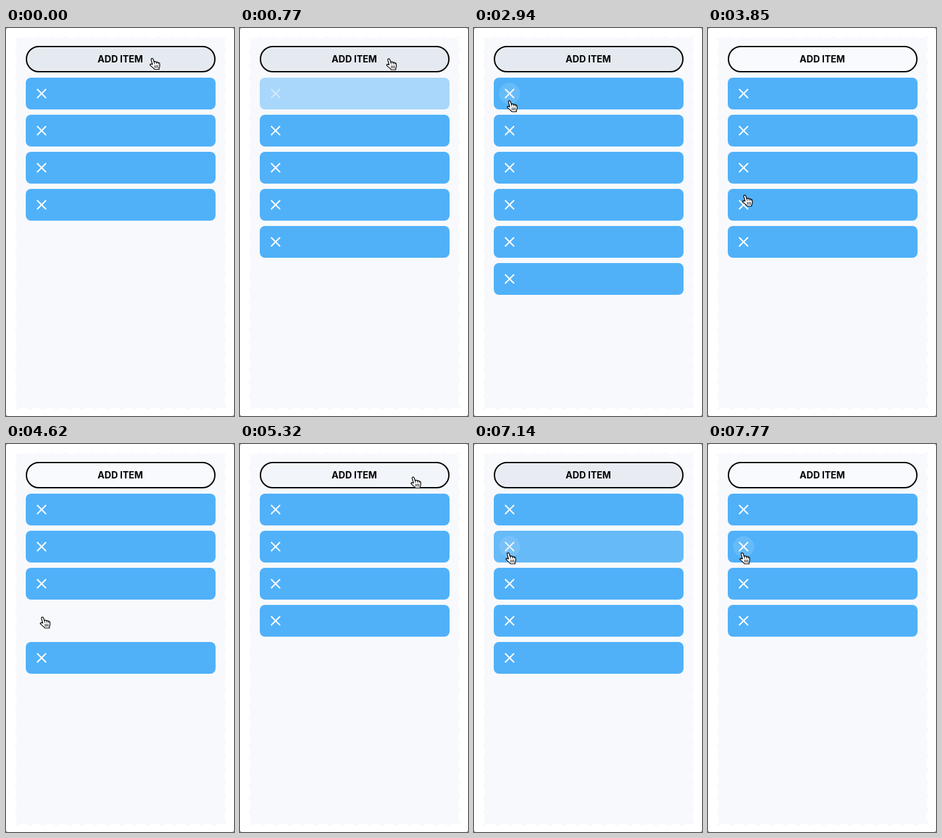
An HTML page with a canvas for the animation above (7840 ms loop, 346x586 px).

```html
<!DOCTYPE html>
<html lang="en">
<head>
<meta charset="utf-8">
<title>Item list</title>
<style>
html, body { margin: 0; width: 100%; height: 100%; overflow: hidden; background: #fff; }
canvas { display: block; width: 346px; height: 586px; }
</style>
</head>
<body>
<canvas id="stage"></canvas>
<script>
const W = 346, H = 586, LOOP = 7840, STEP = 70;
const canvas = document.getElementById('stage');
const ctx = canvas.getContext('2d');
const dpr = window.devicePixelRatio || 1;
canvas.width = W * dpr;
canvas.height = H * dpr;

const ROW = 56, TOP = 75;
const IDLE = [248, 250, 253], HOVER = [242, 246, 250], FOCUS = [229, 234, 240];

// List changes: adds go to the front, removes name a row.
const events = [
  { t: 492, add: true },
  { t: 1822, add: true },
  { t: 3130, row: 0 },
  { t: 4460, row: 3 },
  { t: 5672, add: true },
  { t: 7120, row: 1 }
];
const presses = [350, 1680, 3010, 4340, 5530, 7000];
const PRESS_TIME = 140;

// Pointer path: time, x, y
const path = [
  [0, 223.5, 45.5], [69, 223.5, 45.5], [70, 227.5, 46], [1330, 227.5, 46],
  [1610, 246, 58.5], [2170, 246, 58.5], [2940, 55.5, 109.5], [3010, 56, 110],
  [3360, 56, 110], [3850, 57.5, 252], [4270, 57, 261], [4690, 57, 261],
  [5320, 264.5, 49.5], [5460, 272, 48], [6090, 272, 48], [6300, 116, 207.5],
  [6930, 53.5, 164], [LOOP, 53.5, 164]
];

const clamp = v => Math.max(0, Math.min(1, v));
const smooth = v => { v = clamp(v); return v * v * (3 - 2 * v); };
const mix = (a, b, p) => a + (b - a) * p;
const mixColor = (a, b, p) => a.map((v, i) => mix(v, b[i], p));

function pointerAt(t) {
  const i = path.findIndex(k => k[0] > t);
  const [t0, x0, y0] = path[i - 1], [t1, x1, y1] = path[i];
  const p = smooth((t - t0) / (t1 - t0));
  return { x: mix(x0, x1, p), y: mix(y0, y1, p) };
}

function rowsAt(t) {
  const rows = [0, 1, 2, 3].map(y => ({ y, alpha: 1 }));
  for (const e of events) {
    const age = t - e.t;
    if (age < 0) break;
    if (e.add) {
      const p = smooth(age / 250);
      rows.forEach(r => r.y += p);
      rows.unshift({ y: 0, alpha: clamp((age - 180) / 160) ** 1.5 });
    } else {
      const p = smooth((age - 385) / 250);
      rows.slice(e.row + 1).forEach(r => r.y -= p);
      rows[e.row].alpha = 1 - clamp(age / 150);
      if (!rows[e.row].alpha) rows.splice(e.row, 1);
    }
  }
  return rows;
}

function buttonColor(t) {
  if (t < 3130) return FOCUS;
  if (t < 5180) return mixColor(FOCUS, IDLE, clamp((t - 3130) / 150));
  if (t < 5530) return mixColor(IDLE, HOVER, clamp((t - 5180) / 140));
  if (t < 7120) return mixColor(HOVER, FOCUS, clamp((t - 5530) / 140));
  return mixColor(FOCUS, IDLE, clamp((t - 7120) / 150));
}

function roundRect(x, y, w, h, r) {
  ctx.beginPath();
  ctx.roundRect(x, y, w, h, r);
}

function circle(x, y, r) {
  ctx.beginPath();
  ctx.arc(x, y, r, 0, Math.PI * 2);
}

function drawPanel() {
  ctx.fillStyle = '#777';
  ctx.fillRect(0, 0, W, H);
  ctx.fillStyle = '#fff';
  roundRect(0, 0, W, H, 3);
  ctx.fill();
  ctx.fillStyle = '#f8f9fc';
  ctx.fillRect(14, 13, 320, 563);
  ctx.strokeStyle = '#fff';
  ctx.lineWidth = 2;
  ctx.setLineDash([12, 8]);
  ctx.strokeRect(15, 14, 318, 561);
  ctx.setLineDash([]);
}

function drawButton(t) {
  ctx.fillStyle = `rgb(${buttonColor(t).map(Math.round)})`;
  ctx.strokeStyle = '#000';
  ctx.lineWidth = 2;
  roundRect(31, 28, 286, 38, 19);
  ctx.fill();
  ctx.stroke();
  ctx.fillStyle = '#000';
  ctx.font = '700 14px Inter, Lato, sans-serif';
  ctx.textAlign = 'center';
  ctx.fillText('ADD ITEM', 173.5, 52);
}

function drawRow(row, pointer) {
  const y = TOP + row.y * ROW, cx = 54, cy = y + 24;
  ctx.globalAlpha = row.alpha;
  ctx.fillStyle = '#50b1f9';
  roundRect(30, y, 288, 48, 8);
  ctx.fill();
  if (Math.hypot(pointer.x - cx, pointer.y - cy) < 15) {
    ctx.fillStyle = 'rgba(255,255,255,.13)';
    circle(cx, cy, 16);
    ctx.fill();
  }
  ctx.strokeStyle = '#fff';
  ctx.lineWidth = 2;
  ctx.lineCap = 'round';
  ctx.beginPath();
  for (const d of [-6.3, 6.3]) {
    ctx.moveTo(cx - 6.3, cy - d);
    ctx.lineTo(cx + 6.3, cy + d);
  }
  ctx.stroke();
  ctx.globalAlpha = 1;
}

const hand = new Path2D('M-1.2 9.5L-3.2 2.4Q-3.4.4-1.8.4Q-.6.4 0 2L1.4 6Q2 4.9 3.3 5.2Q4.4 5.4 4.7 6.3' +
  'Q6.6 5.2 7.4 7Q9.4 6.4 9.7 8.6Q10.2 11 9.4 13.5L8.8 15V17H2Q.8 15.4-1.4 13.6Q-3.2 12-4.8 10.6' +
  'Q-5.4 9-3.6 8.8Q-2.2 8.8-1.2 9.5Z');
const creases = new Path2D('M1.4 6L2 8.5M4.7 6.3L5.1 8.5M7.4 7L7.7 8.8M2.4 11V14.5M4.6 11V14.5M6.8 11V14.5');

function drawPointer({ x, y }) {
  ctx.save();
  ctx.translate(x, y);
  ctx.lineJoin = 'round';
  ctx.fillStyle = '#fff';
  ctx.strokeStyle = '#000';
  ctx.lineWidth = 1.2;
  ctx.fill(hand);
  ctx.stroke(hand);
  ctx.lineWidth = 0.9;
  ctx.stroke(creases);
  ctx.restore();
}

function draw(t) {
  const pointer = pointerAt(t);
  ctx.setTransform(dpr, 0, 0, dpr, 0, 0);
  drawPanel();
  drawButton(t);
  rowsAt(t).forEach(row => drawRow(row, pointer));
  if (presses.some(p => t >= p && t < p + PRESS_TIME)) {
    ctx.strokeStyle = 'rgba(0,0,0,.6)';
    ctx.lineWidth = 2.5;
    circle(pointer.x, pointer.y, 30.5);
    ctx.stroke();
  }
  drawPointer(pointer);
}

function tick() {
  const t = (performance.now() - start) % LOOP;
  draw(Math.floor(t / STEP) * STEP);
  requestAnimationFrame(tick);
}

const start = performance.now();
tick();
</script>
</body>
</html>
```
